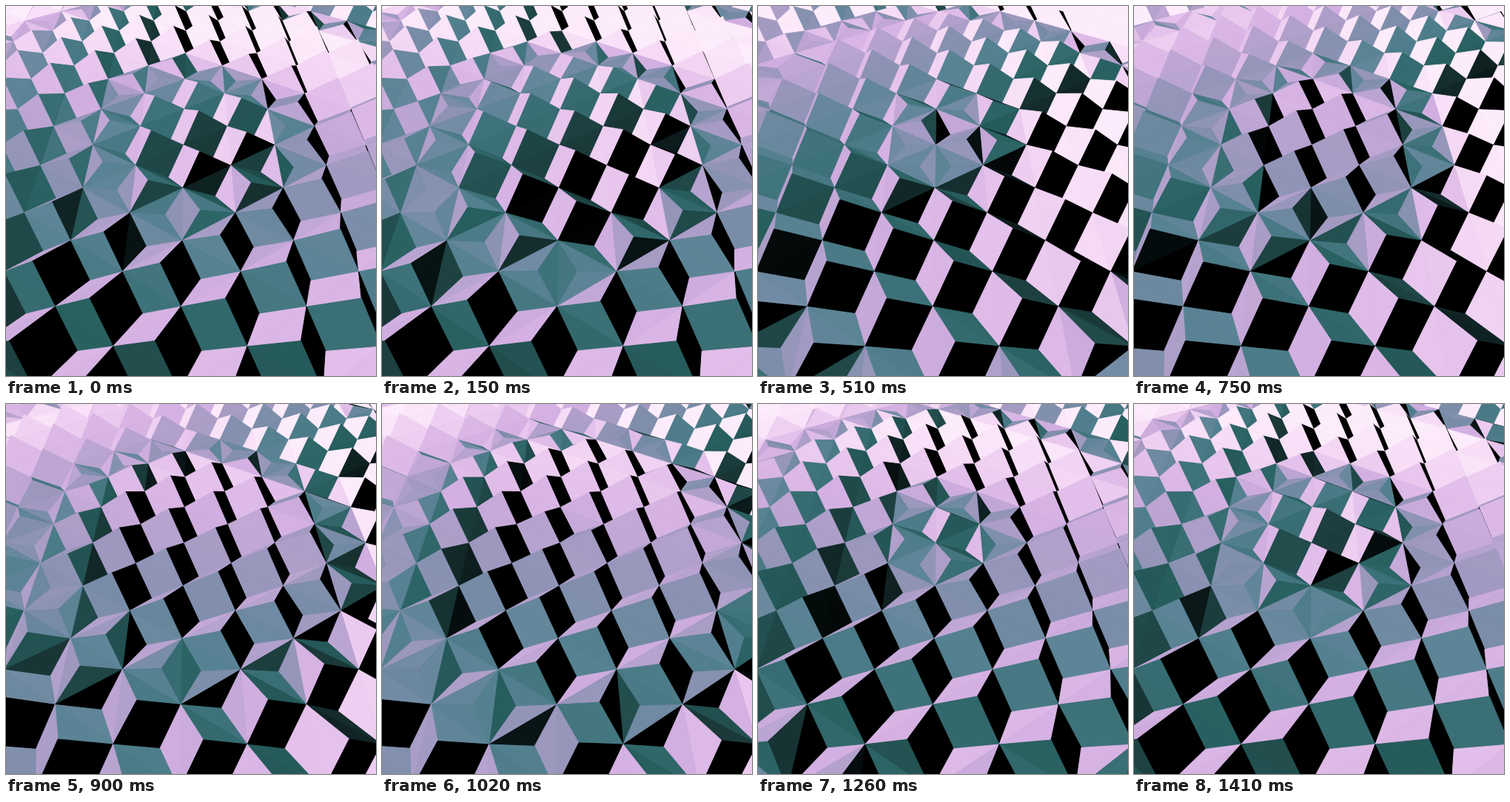
Animation of 500x500 px, one loop 1440 ms. Source, as an HTML page with a canvas:

```html
<!DOCTYPE html>
<html lang="en">
<head>
<meta charset="utf-8">
<title>Folding cubes</title>
<style>
  html, body { margin: 0; width: 100%; height: 100%; overflow: hidden; background: #000; }
  canvas { display: block; width: 500px; height: 500px; }
</style>
</head>
<body>
<canvas id="stage" width="500" height="500"></canvas>
<script>
const ctx = document.getElementById('stage').getContext('2d');
const LOOP = 1440, STEP = 30;
const ROOT3 = Math.sqrt(3);
const PEAK = 1 / Math.sqrt(6); // apex height that turns the facets into cube faces
const CENTER = [0.14, -0.25];  // where the wave starts, in plane coordinates

// tone, red, green, blue
const RAMP = [
  [0, 0, 0, 0], [0.1, 6, 16, 17], [0.2, 25, 53, 53], [0.33, 40, 96, 96],
  [0.42, 63, 115, 123], [0.5, 86, 130, 146], [0.6, 131, 144, 174],
  [0.68, 163, 154, 194], [0.78, 210, 175, 225], [0.86, 230, 195, 236],
  [0.93, 245, 218, 245], [1, 253, 236, 252]
];

function shade(tone) {
  const v = Math.min(1, Math.max(0, tone));
  let k = 1;
  while (RAMP[k][0] < v) k++;
  const a = RAMP[k - 1], b = RAMP[k];
  const f = (v - a[0]) / (b[0] - a[0]);
  const mix = n => Math.round(a[n] + (b[n] - a[n]) * f);
  return `rgb(${mix(1)},${mix(2)},${mix(3)})`;
}

// Grid point in plane coordinates: x to the right, y towards the viewer
const gridPoint = (i, j) => [(i - j) * ROOT3 / 2, (i + j) / 2, 0];

function project([x, y, z]) {
  const w = 1 - 0.092 * y - 0.135 * z;
  return [
    (240 - 23 * y + 123 * x / ROOT3 - 33.75 * z) / w,
    (188 + 35.4 * y - 73.6 * z) / w
  ];
}

function tone(a, b, c) {
  const u = b.map((v, k) => v - a[k]), v = c.map((q, k) => q - a[k]);
  let n = [
    u[1] * v[2] - u[2] * v[1],
    u[2] * v[0] - u[0] * v[2],
    u[0] * v[1] - u[1] * v[0]
  ];
  const len = Math.hypot(...n) * Math.sign(n[2]);
  n = n.map(q => q / len);
  const mid = a.map((q, k) => (q + b[k] + c[k]) / 3);
  const near = n[0] * mid[0] + n[1] * mid[1] + n[2] * mid[2];
  const light = 0.21 - 0.63 * n[0] + 0.03 * n[1] + 0.21 * n[2]
    - 0.13 * near - 0.035 * (mid[0] + mid[1]);
  return 0.95 * Math.pow(Math.max(0, light), 0.6);
}

const cells = [];
function addCell(corners, sign) {
  const mid = [0, 1].map(k => (corners[0][k] + corners[1][k] + corners[2][k]) / 3);
  const dist = Math.hypot(mid[0] - CENTER[0], mid[1] - CENTER[1]);
  cells.push({ corners, sign, mid, dist });
}
for (let i = -12; i <= 10; i++) {
  for (let j = -12; j <= 10; j++) {
    if (i + j < -16 || i + j > 10 || Math.abs(i - j) > 9) continue;
    const a = gridPoint(i, j), b = gridPoint(i + 1, j + 1);
    addCell([a, gridPoint(i + 1, j), b], 1);
    addCell([a, b, gridPoint(i, j + 1)], -1);
  }
}

function lift(dist, time) {
  const c = Math.cos(2 * Math.PI * time / LOOP - 0.82 * dist);
  return Math.sign(c) * (1 - (1 - Math.abs(c)) ** 1.7) * PEAK;
}

function render(time) {
  const facets = [];
  for (const { corners, sign, mid, dist } of cells) {
    const apex = [mid[0], mid[1], sign * lift(dist, time)];
    for (let k = 0; k < 3; k++) {
      const a = corners[k], b = corners[(k + 1) % 3];
      const pts = [a, b, apex].map(project);
      const [p, q, r] = pts;
      const turn = (q[0] - p[0]) * (r[1] - p[1]) - (q[1] - p[1]) * (r[0] - p[0]);
      if (turn <= 0) continue; // facing away
      facets.push({ pts, depth: a[1] + b[1] + apex[1], color: shade(tone(a, b, apex)) });
    }
  }
  facets.sort((f, g) => f.depth - g.depth);

  ctx.fillStyle = '#000';
  ctx.fillRect(0, 0, 500, 500);
  ctx.lineWidth = 0.9;
  ctx.lineJoin = 'round';
  for (const { pts, color } of facets) {
    ctx.fillStyle = ctx.strokeStyle = color;
    ctx.beginPath();
    pts.forEach(([x, y]) => ctx.lineTo(x, y));
    ctx.closePath();
    ctx.fill();
    ctx.stroke();
  }
}

const start = performance.now();
let shown = -1;
function tick() {
  const time = Math.floor((performance.now() - start) % LOOP / STEP) * STEP;
  if (time !== shown) render(shown = time);
  requestAnimationFrame(tick);
}
tick();
</script>
</body>
</html>
```
